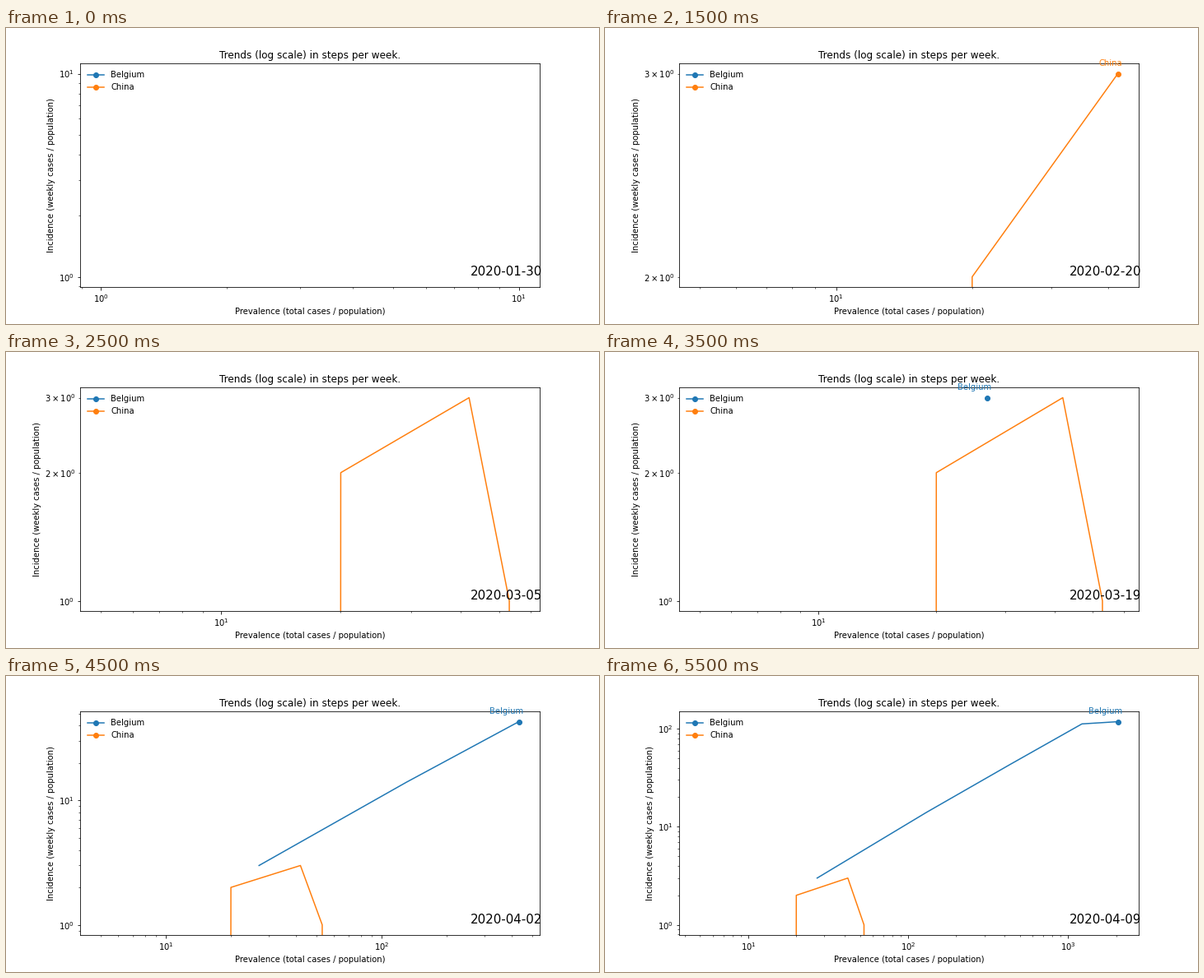
These frames come from a looping animation (720x360 px, 10 s). A matplotlib script:

```python
import matplotlib.pyplot as plt
import numpy as np
from matplotlib.animation import FuncAnimation

plt.rcParams.update({
    "font.family": "DejaVu Sans",
    "font.size": 10,
    "figure.subplot.left": 0.125,
    "figure.subplot.right": 0.9,
    "figure.subplot.bottom": 0.125,
    "figure.subplot.top": 0.88,
})

START = np.datetime64("2020-01-30")
WEEKS = 11      # the date stops here, one more data step follows
FRAMES = 20
MARGIN = 0.05
NO_DATA = [np.nan] * 7

# country: (colour, prevalence, incidence), one value per weekly step
SERIES = {
    "Belgium": ("C0",
                NO_DATA + [27, 130, 432, 1222, 2048],
                NO_DATA + [3, 14, 43, 112, 118]),
    "China": ("C1",
              [0, 5, 20, 42, 53, 56, 57, 58, 58, 58, 59, 59],
              [0, 0, 2, 3, 1, 0, 0, 0, 0, 0, 0, 0]),
}

fig, ax = plt.subplots(figsize=(10, 5), dpi=72)
ax.set_xscale("log")
ax.set_yscale("log")
ax.set_title("Trends (log scale) in steps per week.")
ax.set_xlabel("Prevalence (total cases / population)")
ax.set_ylabel("Incidence (weekly cases / population)")

lines, tags = {}, {}
for name, (color, _, _) in SERIES.items():
    lines[name], = ax.plot([np.nan], [np.nan], "o-", color=color,
                           label=name, markevery=[-1])
    tags[name] = ax.annotate(name, (1, 1), xytext=(5, 10), color=color,
                             textcoords="offset points", ha="right")
ax.legend(loc="upper left", frameon=False)
date = ax.text(0.85, 0.05, "", fontsize=15, transform=ax.transAxes)


def log_limits(values):
    """Padded limits of the positive values, at least one decade if flat."""
    values = np.array(values, float)
    positive = values[values > 0]
    lo, hi = 0.0, 1.0
    if len(set(positive)) > 1:
        lo, hi = np.log10([positive.min(), positive.max()])
    pad = MARGIN * (hi - lo)
    return 10 ** (lo - pad), 10 ** (hi + pad)


def update(i):
    step = min(i, WEEKS)
    all_x, all_y = [], []
    for name, (_, xs, ys) in SERIES.items():
        x, y = xs[:step + 1], ys[:step + 1]
        lines[name].set_data(x, y)
        visible = y[-1] > 0
        tags[name].set_visible(visible)
        if visible:
            tags[name].xy = x[-1], y[-1]
        all_x += x
        all_y += y
    ax.set_xlim(log_limits(all_x))
    ax.set_ylim(log_limits(all_y))
    date.set_text(str(START + 7 * min(i, WEEKS - 1)))
    return [*lines.values(), *tags.values(), date]


anim = FuncAnimation(fig, update, frames=FRAMES, interval=500,
                     init_func=lambda: update(0), repeat=True,
                     repeat_delay=0, blit=False)
plt.show()
```
